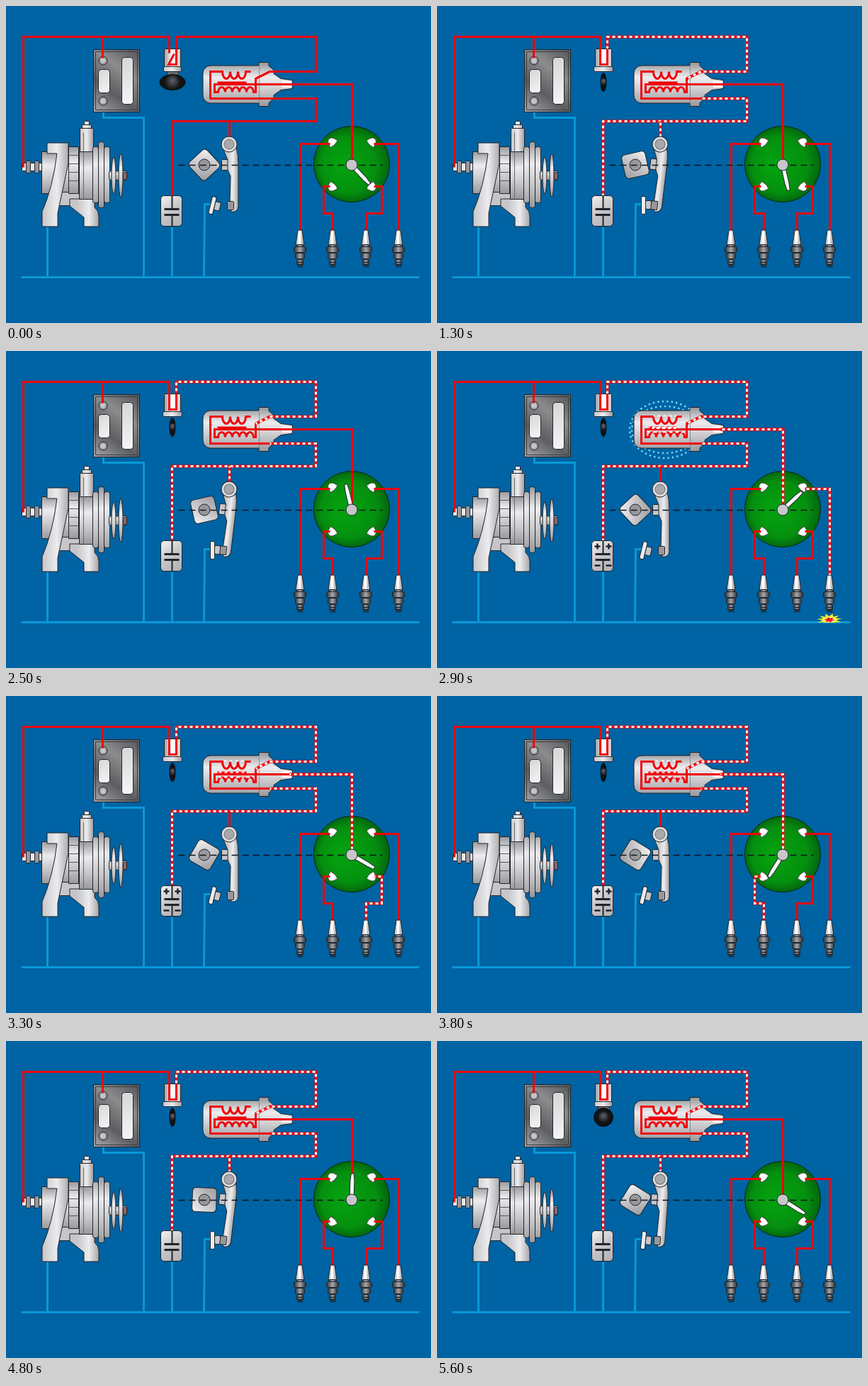
These frames come from a looping animation (600x447 px, 5.7 s). An HTML page with a canvas:

```html
<!DOCTYPE html>
<html lang="en">
<head>
<meta charset="utf-8">
<title>Ignition circuit</title>
<style>
html, body { margin: 0; width: 100%; height: 100%; overflow: hidden; background: #0063a3; }
canvas { display: block; width: 600px; height: 447px; }
</style>
</head>
<body>
<canvas id="stage" width="600" height="447"></canvas>
<script>
const ctx = document.getElementById('stage').getContext('2d');
const LOOP = 5700, HOLD = 800, STEP = 100, LAST = 49;
const RED = '#f0040c', BLUE = '#0a98d8', INK = '#20252b', WHITE = '#f6f6f6';
const LIGHT = '#ececee', MID = '#c6c6c9', DARK = '#98989c';

const FEED = 'M240 62V43H437V92H372L352 102';
const RETURN = 'M372 130H437V162H234V268';
const HIGH = 'M400 110H488V217';
const PRIMARY = 'M378 130H288V92H305' + 'a5.5 10 0 0 0 11 0'.repeat(3) + 'H345';
const SECONDARY = 'M404 110H294V121H299' + 'a5 7 0 0 1 10 0'.repeat(5) + 'H352V102L372 92';

const clamp = v => Math.max(0, Math.min(1, v));

// Shaft turns 15 degrees a step once the engine cranks, with a short surge midway.
const shaftAngle = step => 47 + 15 * Math.max(0, step - 4) + 30 * clamp((step - 22) / 9);

function fade(x0, y0, x1, y1, ...colors) {
  const g = ctx.createLinearGradient(x0, y0, x1, y1);
  colors.forEach((c, i) => g.addColorStop(i / (colors.length - 1), c));
  return g;
}

const across = (x, w) => fade(x, 0, x + w, 0, MID, LIGHT, DARK);
const down = (y, h) => fade(0, y, 0, y + h, DARK, LIGHT, MID, DARK);

function line(d, color, width = 3, dash = [], offset = 0) {
  ctx.save();
  ctx.translate(.5, .5);
  ctx.strokeStyle = color;
  ctx.lineWidth = width;
  ctx.setLineDash(dash);
  ctx.lineDashOffset = offset;
  ctx.stroke(new Path2D(d));
  ctx.restore();
}

function shape(path, fill, edge = INK) {
  ctx.fillStyle = fill;
  ctx.fill(path);
  if (!edge) return;
  ctx.strokeStyle = edge;
  ctx.lineWidth = 1;
  ctx.stroke(path);
}

const form = (d, fill, edge) => shape(new Path2D(d), fill, edge);

function box(x, y, w, h, fill, r = 0, edge) {
  const path = new Path2D();
  path.roundRect(x + .5, y + .5, w - 1, h - 1, r);
  shape(path, fill, edge);
}

function oval(x, y, rx, ry, fill, edge) {
  const path = new Path2D();
  path.ellipse(x, y, rx, ry, 0, 0, Math.PI * 2);
  shape(path, fill, edge);
}

function at(x, y, deg, draw) {
  ctx.save();
  ctx.translate(x, y);
  ctx.rotate(deg * Math.PI / 180);
  draw();
  ctx.restore();
}

function wire(d, live, step) {
  line(d, RED, live ? 4 : 3);
  if (live) line(d, WHITE, 3, [4, 4], -step * 3);
}

function ground() {
  line('M21 382H583', BLUE);
  line('M58 311V382M137 138V157H194V382M234 310V382M291 279H280L279 382', BLUE);
}

function alternator() {
  // Terminal bolts
  for (let i = 0; i < 5; i++) {
    const tall = i % 2 * 6;
    box(22 + i * 6, 221 - tall / 2, 7, 12 + tall, tall ? DARK : LIGHT, 1);
  }
  box(50, 205, 54, 60, down(205, 60));
  box(66, 262, 46, 20, MID);
  form('M90 272H125V284Q131 289 131 296V311H110V298L90 282Z', across(100, 34));
  form('M58 193H88V222L73 292V311H51V290Q66 256 72 208H58Z', across(51, 42));
  box(88, 198, 15, 67, down(198, 67));
  line('M88 210h14m0 12h-14m0 12h14m0 12h-14', '#55575b', 1);
  box(103, 205, 23, 68, down(205, 68));
  // Top bracket
  for (let i = 0; i < 3; i++) box(110 - i * 3, 162 + i * 5, 8 + i * 6, i < 2 ? 6 : 34, across(104, 20), 1);
  line('M109 178V272', '#66686c', 1);
  // Fan and pulley
  for (let i = 0; i < 3; i++) box(122 + i * 8, 198 - i % 2 * 7, 9, 80 + i % 2 * 14, down(191, 94), 3);
  box(145, 232, 26, 14, down(232, 14), 2);
  for (const side of [0, 1]) oval(152 + side * 10, 239, 3, 26 + side * 5, down(207, 64));
  box(165, 234, 6, 11, '#8f6a6c', 2);
}

function battery() {
  box(123, 61, 66, 89, fade(125, 148, 187, 63, '#a4a4a6', '#5c5e61', '#8c8c8e', '#56585b'));
  line('M126 64H185V146H126Z', '#3a3c40', 1);
  for (const [x, y, h] of [[130, 89, 34], [163, 72, 67]]) {
    box(x, y, 17, h, fade(x, y, x + 17, y + h, '#d6d6d6', WHITE), 4);
  }
  for (const y of [77, 134]) {
    oval(137, y, 6, 6, DARK);
    oval(137, y, 3.5, 3.5, MID, null);
  }
}

// turn: 0 off, 1 half way, 2 on
function ignitionSwitch(turn) {
  box(223, 60, 24, 27, fade(223, 0, 247, 0, DARK, '#ffffff', MID), 1);
  box(221 + (turn < 2), 85, 28 - 2 * (turn < 2), 8, across(221, 28), 2);
  if (turn < 2) box(227, 92, 17, 7, '#6b6d71', 2);
  const rx = [18, 13.5, 4][turn], ry = turn ? 13 : 11;
  const shade = ctx.createRadialGradient(235, 105, 1, 235, 108, Math.max(rx, 8));
  shade.addColorStop(0, '#5a5d61');
  shade.addColorStop(.6, '#101315');
  oval(235, 107.5, rx, ry, shade, '#0a0c0e');
  line(turn ? 'M230 42V82H240V60' : 'M230 42V66M240 60V82H229L237 67', RED);
}

function field() {
  for (let i = 0; i < 2; i++) {
    const path = new Path2D();
    path.ellipse(322, 111, 50 - i * 3, 40 - i * 7, 0, 0, Math.PI * 2);
    ctx.save();
    ctx.strokeStyle = '#6fd6f4';
    ctx.lineWidth = 2.5;
    ctx.setLineDash([2.5, 4]);
    ctx.stroke(path);
    ctx.restore();
  }
}

function coil(step, live, lit, spark) {
  if (spark) field();
  // The shell mirrors about its axis: offsets run from the tip back to the base.
  const half = [[404, 6], [388, 8], [378, 15], [378, 20], [371, 26], [371, 31], [357, 31], [357, 26.5]];
  const shell = new Path2D();
  half.forEach(([x, dy]) => shell.lineTo(x, 110.5 - dy));
  shell.arcTo(278, 84, 278, 110, 11);
  shell.arcTo(278, 137, 357, 137, 11);
  half.reverse().forEach(([x, dy]) => shell.lineTo(x, 110.5 + dy));
  shell.closePath();
  shape(shell, down(80, 62));
  line('M357 85V136', 'rgba(70,72,76,.45)', 1);
  line('M389 110H403', WHITE, 9);

  line(PRIMARY, RED);
  line(SECONDARY, RED);
  line('M298 108H339', RED, 4);
  wire(FEED, live, step);
  wire(RETURN, live, step);
  wire(HIGH, lit, step);
  if (lit) line('M305 91H338M298 107H340M298 114H348', WHITE, 2, [4, 4], step * 3);
  if (spark) line('M303 108H337', WHITE, 3, [5, 3], step * 3);
}

function capacitor(charged) {
  box(218, 267, 31, 44, fade(218, 267, 249, 311, '#f4f4f4', MID, '#b0b0b4'), 5);
  line('M234 267V286M234 295V311', INK, 2);
  line('M223 286H244M223 294H244', INK, 3);
  if (charged) for (const x of [226, 242]) line(`M${x - 4} 275h8m-4 -4v8M${x - 4} 302h8`, INK, 2.5);
}

function breaker(angle, open) {
  const metal = fade(-18, -18, 18, 18, WHITE, MID, DARK);
  at(280, 224, angle, () => box(-17.5, -17.5, 35, 35, metal, 5));
  oval(280, 224, 8, 8, DARK);

  at(291, 281, open * 14, () => {
    box(3, -7, 9, 13, MID, 2);
    box(-3, -13, 7, 26, LIGHT, 2);
  });
  at(315, 195, (1 - open) * 6.8, () => {
    box(-11, 21, 10, 16, MID, 1);
    form('M10 4Q13 15 13 28V88Q12 96 3 95L1 80L2 45L-2 36V22L-9 5Z', across(-3, 17));
    box(-3, 80, 10, 13, DARK, 1);
    oval(0, 0, 11, 11, '#dcdcde');
    oval(0, 0, 7, 7, '#a9a9ad', '#6d6f73');
  });
}

function distributor() {
  const green = ctx.createRadialGradient(474, 225, 8, 488, 223, 56);
  green.addColorStop(0, '#04a010');
  green.addColorStop(.65, '#04900e');
  green.addColorStop(1, '#046010');
  oval(488, 223, 53.5, 53.5, green, '#06280c');
  for (let i = 0; i < 4; i++) {
    const turn = 45 + i * 90, a = turn * Math.PI / 180;
    at(488.5 + 39 * Math.cos(a), 223.5 + 44 * Math.sin(a), turn, () =>
      form('M-3 -7Q7 -5 7 0Q7 5 -3 7Q-6 0 -3 -7Z', '#ffffff', '#445544'));
  }
}

// Cylinders follow the shaft quadrants: lower right, lower left, upper left, upper right.
function cylinder(quad) {
  const side = quad === 0 || quad === 3 ? 1 : -1, upper = quad > 1;
  const x = 484.5 + side * (upper ? 69.5 : 23.5), pin = 488 + side * 31;
  const path = upper ? `M${pin} 194H${x}V317` : `M${pin} 254H${489 + side * 41}V292H${x}V317`;
  return { x, path };
}

function rotor(angle) {
  at(488, 224, angle, () => form('M4 -3H27L37 -2V2L27 3H4Z', WHITE));
  oval(488, 224, 8, 8, MID);
}

function plug(x) {
  form(`M${x - 3} 316h6l3 21h-12Z`, across(x - 6, 12));
  line(`M${x - 1} 318V335`, '#ffffff', 3);
  for (let i = 0; i < 4; i++) {
    const w = i ? 11 - i * 2 : 6, y = 328 + i * 9 + (i ? 2 : 8);
    box(x - w, y, w * 2, i ? 9 : 5, fade(x - w, 0, x + w, 0, INK, '#a8a8ac', INK), 2);
  }
  line(`M${x - 4} 361h8m0 3h-8m0 3h8`, INK, 1.5);
}

// A burst flattened against the ground line.
function flash(x, step) {
  const star = (size, rays, color) => {
    const path = new Path2D();
    for (let i = 0; i < rays * 2; i++) {
      const a = i * Math.PI / rays + step * .2, r = size * (i % 2 ? .55 : 1);
      path.lineTo(x + Math.cos(a) * r, Math.min(383, 379 + Math.sin(a) * r * .5));
    }
    path.closePath();
    shape(path, color, null);
  };
  star(18, 11, '#f4f020');
  star(11, 8, '#ffffa0');
  star(8, 6, '#f01818');
}

function draw(step) {
  const angle = shaftAngle(step), phase = angle % 90, quad = Math.floor(angle / 90) % 4;
  const live = step > 0;
  const lit = step > 2 && step < LAST && phase > 22 && phase < 64;
  const spark = lit && step > 3 && Math.abs(phase - 45) < 10;
  const half = step === LAST || phase > 19 && phase < 68;
  const open = lit || step < 3 ? 1 : half ? .4 : 0;
  const turn = !live ? 0 : step === 1 || step === LAST ? 1 : 2;
  const cylinders = [0, 1, 2, 3].map(cylinder);

  ctx.fillStyle = '#0063a3';
  ctx.fillRect(0, 0, 600, 447);
  ground();
  alternator();
  battery();
  line('M24 227V43H231M136 43V73', RED);
  coil(step, live, lit, spark);
  ignitionSwitch(turn);
  capacitor(lit);
  wire('M315 162V184', live && open < 1, step);
  breaker(angle, open);
  distributor();
  cylinders.forEach((c, i) => wire(c.path, lit && i === quad, step));
  wire(HIGH, lit, step);
  cylinders.forEach(c => plug(c.x));
  line('M243 224H531', '#101418', 1.3, [9, 6]);
  rotor(angle);
  if (spark) flash(cylinders[quad].x, step);
}

function tick() {
  const t = performance.now() % LOOP;
  draw(t < HOLD ? 0 : Math.min(LAST, Math.floor((t - HOLD) / STEP) + 1));
  requestAnimationFrame(tick);
}
tick();
</script>
</body>
</html>
```
